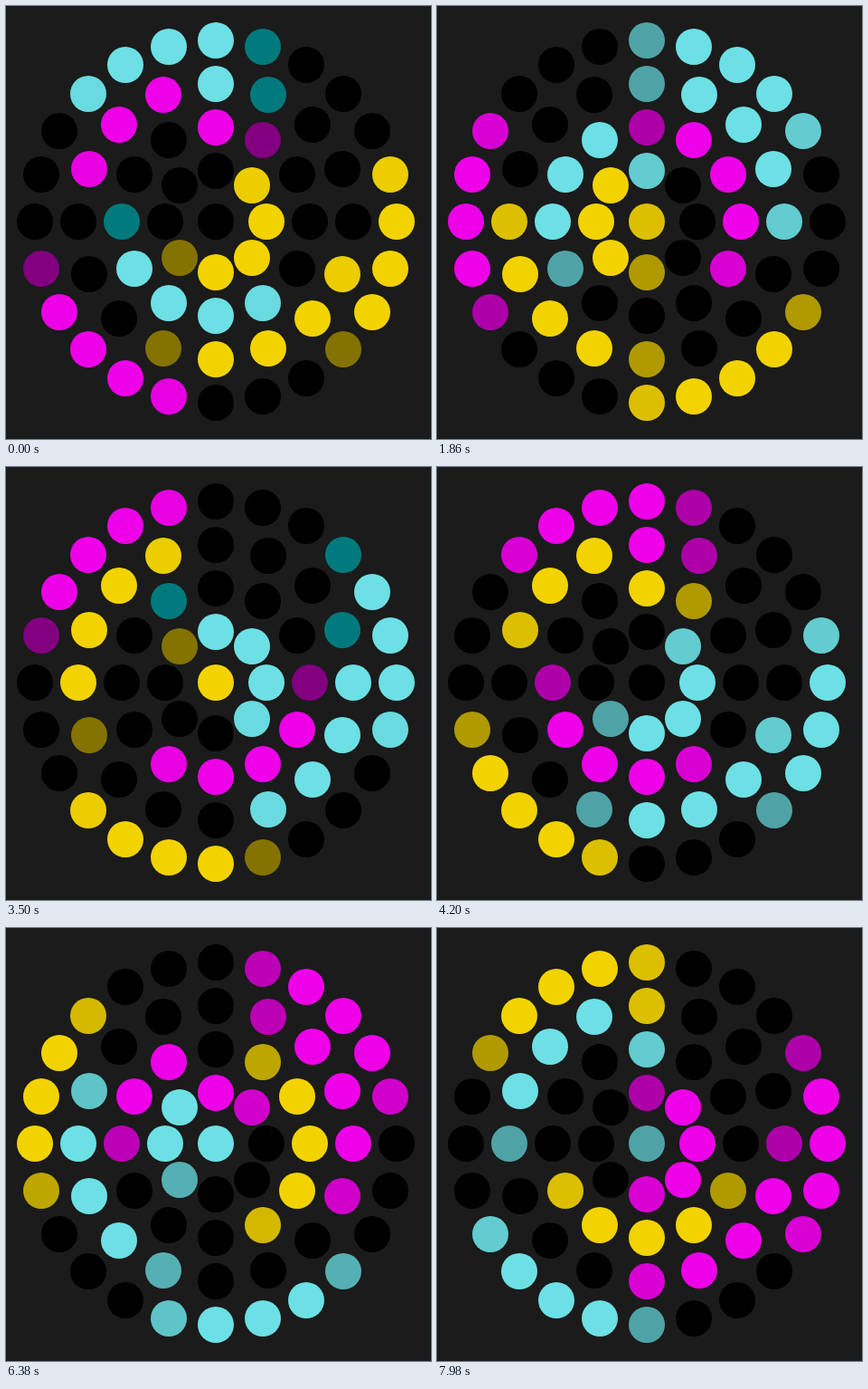
Recreate the animation shown at these times as an HTML page. Size 470 px wide and 478 px high, loop 8000 ms.

```html
<!DOCTYPE html>
<html lang="en">
<head>
<meta charset="utf-8">
<title>LED rings</title>
<style>
  html, body { margin: 0; width: 100%; height: 100%; overflow: hidden; background: #1a1b1a; }
  svg { display: block; width: 100%; height: 100%; }
</style>
</head>
<body>
<svg id="stage" viewBox="0 0 470 478"></svg>
<script>
  const LOOP = 8000;
  const STEP = 51;          // ms per tenth of a dot
  const START = -29;        // strip offset at time zero, in tenths
  const GAMMA = 3.8;
  const COLORS = [[108, 224, 229], [242, 211, 0], [238, 0, 232]];
  const RINGS = [[24, 200], [16, 152], [12, 104], [8, 56], [1, 0]];

  const stage = document.getElementById("stage");
  const mod = (a, b) => ((a % b) + b) % b;

  function addDot(x, y) {
    const dot = document.createElementNS("http://www.w3.org/2000/svg", "circle");
    dot.setAttribute("cx", Math.round(x));
    dot.setAttribute("cy", Math.round(y));
    dot.setAttribute("r", 20);
    stage.appendChild(dot);
    return dot;
  }

  // One continuous strip, wound ring by ring from the outside in.
  const strip = RINGS.flatMap(([count, radius]) =>
    Array.from({ length: count }, (_, i) => {
      const angle = 2 * Math.PI * i / count;
      return addDot(232 + radius * Math.sin(angle), 238 - radius * Math.cos(angle));
    }));

  function dotColor(index, offset) {
    const place = mod(10 * (index + 1) - offset, 240);
    const along = place % 80;
    const level = Math.max(0, Math.min(along, 10, 50 - along)) / 10;
    const light = Math.pow(level, 1 / GAMMA);
    const [r, g, b] = COLORS[Math.floor(place / 80)].map(c => Math.round(c * light));
    // The weak red part of cyan drops out at low levels.
    const red = place < 80 && level < 0.25 ? 0 : r;
    return `rgb(${red},${g},${b})`;
  }

  function draw(time) {
    const offset = START + Math.floor(time / STEP);
    strip.forEach((dot, i) => dot.setAttribute("fill", dotColor(i, offset)));
  }

  const began = performance.now();
  function tick() {
    draw((performance.now() - began) % LOOP);
    requestAnimationFrame(tick);
  }
  draw(0);
  requestAnimationFrame(tick);
</script>
</body>
</html>
```
